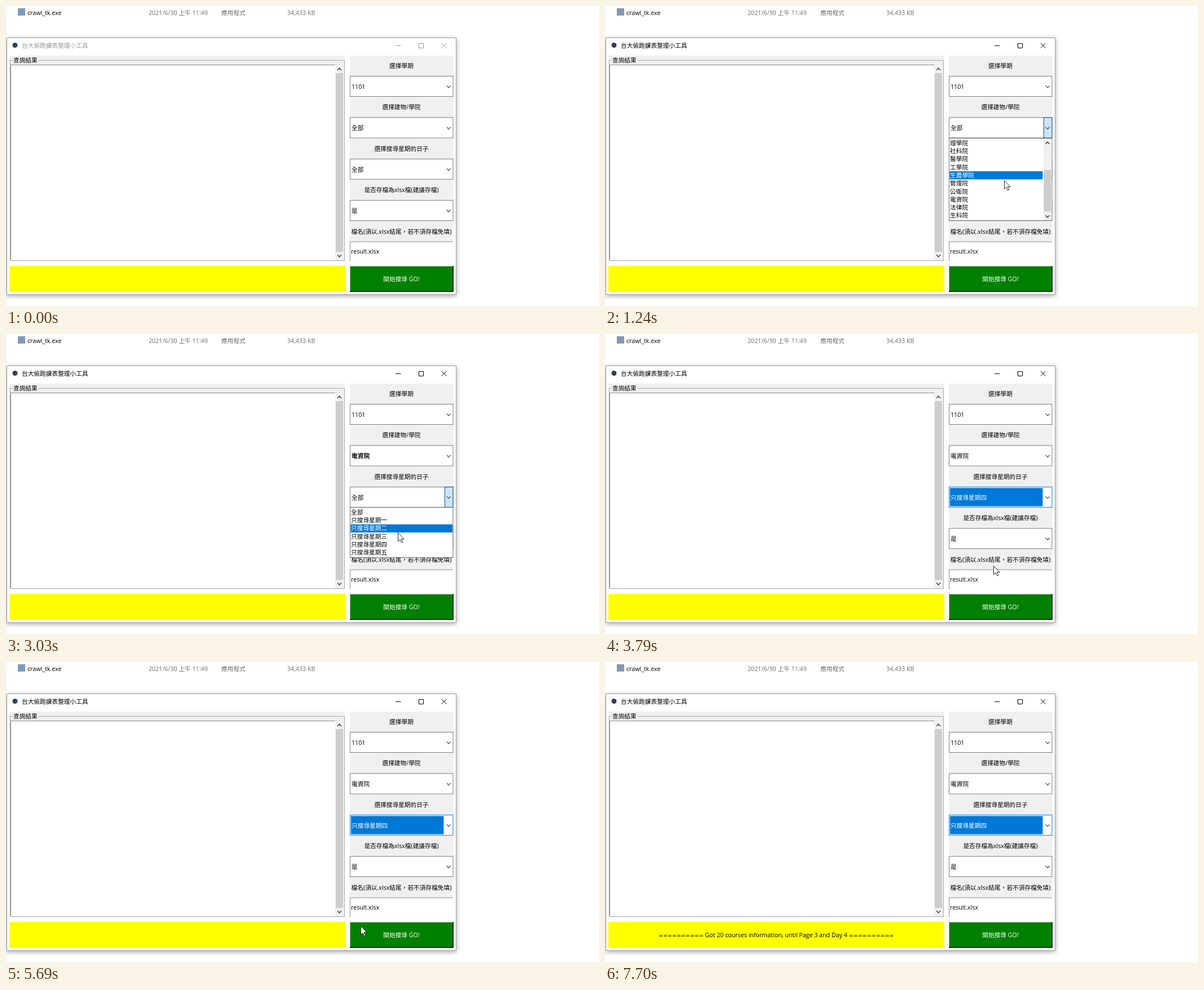
These frames come from a looping animation (1052 px wide and 532 px high, 8000 ms). An HTML page:

```html
<!DOCTYPE html>
<html lang="zh-Hant">
<head>
<meta charset="utf-8">
<title>課表整理小工具</title>
<style>
html, body { margin: 0; width: 100%; height: 100%; overflow: hidden; background: #fff; }
svg { display: block; width: 1052px; height: 532px; }
text { font: 10.7px "Open Sans", "Noto Sans CJK TC", "Noto Sans CJK", "Noto Sans", sans-serif; }
.eq { font: 9.5px "DejaVu Sans", sans-serif; }
.shadow { filter: drop-shadow(0 2px 4px rgba(0, 0, 0, .36)); }
</style>
</head>
<body>
<svg viewBox="0 0 1052 532" xmlns="http://www.w3.org/2000/svg">
  <g id="base"></g>
  <g id="live"></g>
  <path id="pointer" d="M0 0V15.2L3.5 11.9L6 17.4L8.3 16.4L5.9 11H10.6Z" fill="#fff" stroke="#111" stroke-width=".9"/>
</svg>
<script>
const LOOP = 8000;
const COL = { x: 610, w: 183.5, mid: 701.5 };
const ROW = 14.3;
const BLUE = '#0078d7', FACE = '#f0f0f0', THUMB = '#cdcdcd';

const T = {
  open1: 610, close1: 1790, open2: 2400, close2: 3590,
  press: 5160, release: 5620, gone: 6710
};

// time, x, y
const track = [
  [70, 915, 330], [470, 718, 222], [610, 712, 217], [820, 710, 262],
  [1030, 709, 272], [1170, 709, 298], [1240, 708, 309], [1520, 709, 345],
  [1860, 709, 345], [2120, 703, 300], [2260, 702, 296], [2550, 702, 298],
  [3030, 695, 352], [3310, 693, 364], [3450, 693, 370], [3590, 693, 370],
  [3870, 687, 427], [4270, 690, 372], [4400, 688, 378], [4960, 660, 466],
  [5620, 660, 466], [5910, 533, 476], [6440, 533, 476], [6710, 533, 534]
];

const colleges = ['全部', '共同', '普通', '新生', '綜合', '文學院', '理學院', '社科院', '醫學院',
  '工學院', '生農學院', '管理院', '公衛院', '電資院', '法律院', '生科院'];
const days = ['全部', ...[...'一二三四五'].map(d => '只搜尋星期' + d)];
const labels = ['選擇學期', '選擇建物/學院', '選擇搜尋星期的日子', '是否存檔為xlsx檔(建議存檔)',
  '檔名(須以.xlsx結尾，若不須存檔免填)'];

const rect = (x, y, w, h, fill, stroke) =>
  `<rect x="${x}" y="${y}" width="${w}" height="${h}" fill="${fill}"${stroke ? ` stroke="${stroke}"` : ''}/>`;
const path = (d, stroke, width = 1) => `<path d="${d}" fill="none" stroke="${stroke}" stroke-width="${width}"/>`;
const text = (x, y, s, fill = '#000', extra = '') => `<text x="${x}" y="${y}" fill="${fill}" ${extra}>${s}</text>`;
const centred = (x, y, s, fill) => text(x, y, s, fill, 'text-anchor="middle"');
const chevron = (x, y, dir = 1, color = '#444', width = 1.2) =>
  path(`M${x - 3.5} ${y - 1.8 * dir}L${x} ${y + 1.8 * dir}L${x + 3.5} ${y - 1.8 * dir}`, color, width);
const comboTop = i => 124.5 + i * 73.4;

function drawBase() {
  const bands = labels.map((s, i) => {
    const y = 88 + i * 73.4;
    return rect(COL.x, y, COL.w, 36.4, FACE) + centred(COL.mid, y + 22, s);
  }).join('');
  return path('M.5 0V532', '#f0f0f0') +
    rect(21, 4, 13, 13, '#7f9bb8') +
    text(38, 15.5, 'crawl_tk.exe') +
    text(253, 15.5, '2021/6/30 上午 11:49', '#6d6d6d') +
    text(382, 15.5, '應用程式', '#6d6d6d') +
    text(499, 15.5, '34,433 KB', '#6d6d6d') +
    `<g class="shadow">${rect(1.5, 56.5, 797, 455, '#fff', '#a5a5a5')}</g>` +
    '<circle cx="16" cy="69.500" r="4.5" fill="#2f3d59"/>' +
    rect(6, 88, 595, 364, FACE) +
    rect(7.5, 96.5, 593, 355, 'none', '#a9a9a9') +
    rect(12, 90, 45, 12, FACE) + text(13, 100, '查詢結果') +
    rect(8, 104, 576, 346, '#fff') + path('M8.5 450V104.500H584', '#8a8a8a') +
    rect(585, 119, 13, 317, THUMB) +
    chevron(591.5, 112, -1, '#444', 1.6) + chevron(591.5, 443, 1, '#444', 1.6) +
    rect(6, 461, 596, 46, '#ff0') +
    bands +
    rect(COL.x, 417.5, COL.w, 35, '#fff') + path('M610.5 452V418H793', '#8a8a8a') +
    text(612, 439, 'result.xlsx');
}

function drawTitle(active) {
  const c = active ? '#000' : '#999';
  return text(28, 74, '台大偷跑課表整理小工具', c) +
    path('M691 70.500H700.500M732.500 66.500H740.500V74.500H732.500ZM773 66L781.500 74.500M781.500 66L773 74.500', c);
}

function drawCombo(i, value, { open, selected, hover, bold }) {
  const y = comboTop(i);
  const border = selected ? BLUE : hover ? '#171717' : '#7a7a7a';
  return rect(610.5, y, 182.5, 36, '#fff', border) +
    (selected ? rect(612, y + 1.8, 164.5, 32.4, BLUE) : '') +
    (open ? rect(778.5, y, 14.5, 36, '#cce4f7', '#005499') : '') +
    text(613, y + 22.2, value, selected ? '#fff' : '#000', bold ? 'style="font-weight:700"' : '') +
    chevron(785.2, y + 18.6);
}

function drawList(top, items, hot, barWidth) {
  const y0 = top + 1.4;
  return rect(610.5, top, 182.5, items.length * ROW + 3, '#fff', '#6a6a6a') +
    items.map((s, i) => {
      const y = y0 + i * ROW, on = i === hot;
      return (on ? rect(611.5, y, 180.5 - barWidth, ROW, BLUE) : '') +
        text(612, y + 10.8, s, on ? '#fff' : '#000');
    }).join('');
}

function drawScrollbar(offset) {
  return rect(778, 235, 14.5, 145, FACE) + rect(778.5, 248 + offset * 7.2, 13, 73, THUMB) +
    chevron(785, 243, -1, '#444', 1.6) + chevron(785, 373, 1, '#444', 1.6);
}

function drawButton(down) {
  const [light, dark] = down ? ['#696969', '#fff'] : ['#9fb59f', '#111'];
  const shift = down ? 1 : 0;
  return rect(610, 461, 184, 46, down ? FACE : '#008000') +
    path('M610.5 507V461.500H794', light) +
    path('M610 506.200H793.200V461', dark, 1.6) +
    centred(COL.mid + shift, 488 + shift, '開始搜尋 GO!', down ? '#000' : '#fff');
}

function drawStatus(t) {
  if (t < 6440) return '';
  const [count, page] = t < 7040 ? [7, 1] : t < 7700 ? [9, 2] : [20, 3];
  const bar = `<tspan class="eq">${'='.repeat(10)}</tspan>`;
  return centred(303.7, 488, `${bar} Got ${count} courses information, until Page ${page} and Day 4 ${bar}`);
}

function pointerAt(t) {
  const i = track.findIndex(k => k[0] > t);
  if (i === 0) return track[0].slice(1);
  if (i < 0) return track[track.length - 1].slice(1);
  const a = track[i - 1], b = track[i], f = (t - a[0]) / (b[0] - a[0]);
  return [1, 2].map(n => a[n] + (b[n] - a[n]) * f);
}

function drawLive(t, [px, py]) {
  const during = (a, b) => t >= a && t < b;
  const list1 = during(T.open1, T.close1), list2 = during(T.open2, T.close2);
  const shown = during(70, T.gone);
  const hover = i => shown && !list1 && !list2 && px > 610 && px < 794 &&
    py >= comboTop(i) && py <= comboTop(i) + 36;
  // the highlight trails the pointer slightly
  const lagY = pointerAt(t - 70)[1];
  const hotRow = top => Math.max(0, Math.floor((lagY - top - 1.4) / ROW));

  let out = drawTitle(t >= 540) +
    drawCombo(0, '1101', { hover: hover(0) }) +
    drawCombo(1, t < T.close1 ? '全部' : '電資院', {
      open: list1, selected: during(T.close1, T.open2), hover: hover(1), bold: during(T.close1, T.close2)
    }) +
    drawCombo(2, t < T.close2 ? '全部' : '只搜尋星期四', {
      open: list2, selected: t >= T.close2, hover: hover(2)
    }) +
    drawCombo(3, '是', { hover: hover(3) }) +
    drawButton(during(T.press, T.release)) + drawStatus(t);

  if (list1) {
    const offset = t < 960 ? 0 : t < 1100 ? 4 : 6;
    out += drawList(234.5, colleges.slice(offset, offset + 10), hotRow(234.5), 15.5) + drawScrollbar(offset);
  }
  if (list2) out += drawList(307.6, days, hotRow(307.6), 0);
  return out;
}

const [base, live, pointer] = ['base', 'live', 'pointer'].map(id => document.getElementById(id));
base.innerHTML = drawBase();
let last = '';

function render(t) {
  const p = pointerAt(t);
  const markup = drawLive(t, p);
  if (markup !== last) live.innerHTML = last = markup;
  pointer.setAttribute('transform', `translate(${p.map(v => Math.round(v) + .5)})`);
  pointer.setAttribute('visibility', t >= 70 && t < T.gone ? 'visible' : 'hidden');
}

const start = performance.now();
function tick() {
  render((performance.now() - start) % LOOP);
  requestAnimationFrame(tick);
}
tick();
</script>
</body>
</html>
```
